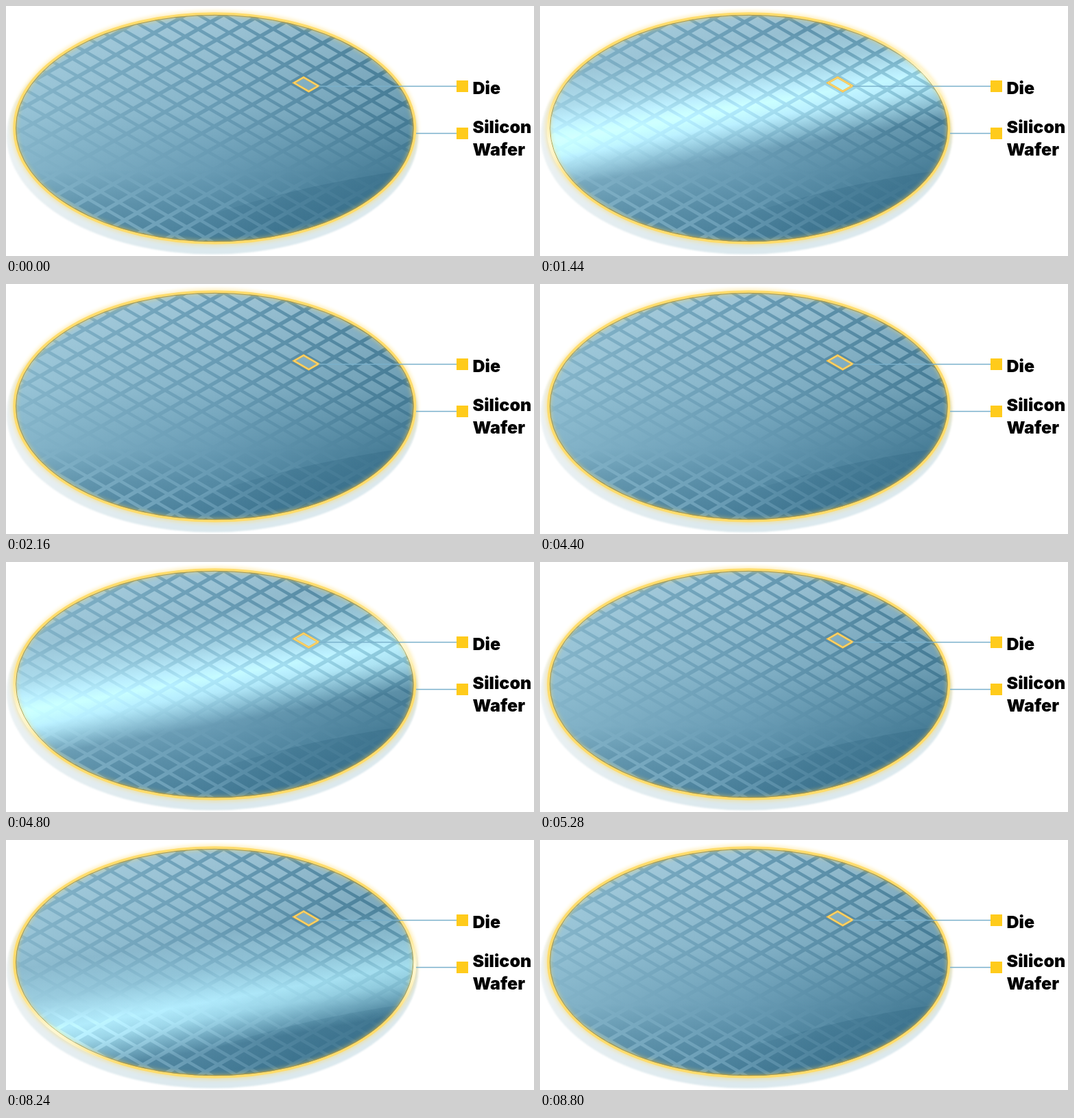
Recreate the animation shown at these times as an HTML page with a canvas. Size 770x366 px, loop 10000 ms.

```html
<!DOCTYPE html>
<html lang="en">
<head>
<meta charset="utf-8">
<title>Silicon wafer</title>
<style>
  html, body { margin: 0; width: 100%; height: 100%; overflow: hidden; background: #fff; }
  canvas, svg { position: absolute; left: 0; top: 0; }
  text { font: 900 25px Inter, sans-serif; }
</style>
</head>
<body>
<canvas id="stage" width="770" height="366"></canvas>
<svg width="770" height="366">
  <path d="M456 117.5H658M598 186.5H658" stroke="#79b0cb" stroke-width="1.3"/>
  <path d="M657 109h17v17h-17zM657 178h17v17h-17z" fill="#ffcb1b"/>
  <text x="680.5" y="129">Die</text>
  <text x="680.5" y="186">Silicon</text>
  <text x="680.5" y="218.5">Wafer</text>
</svg>
<script>
const ctx = document.getElementById('stage').getContext('2d');
const LOOP = 10000, STEP = 80, SWEEP = 840;
const SWEEP_STARTS = [1120, 4440, 7760];
const NORMAL = [0.177, 0.984]; // direction in which the shine travels

function gradient(x0, y0, x1, y1, stops) {
  const g = ctx.createLinearGradient(x0, y0, x1, y1);
  for (const [at, color] of stops) g.addColorStop(at, color);
  return g;
}

function oval(cx, cy, rx, ry) {
  const p = new Path2D();
  p.ellipse(cx, cy, rx, ry, 0, 0, 2 * Math.PI);
  return p;
}

function addTile(path, x, y) {
  path.moveTo(x, y);
  path.lineTo(x + 14, y - 8);
  path.lineTo(x + 35.5, y + 4.5);
  path.lineTo(x + 21.5, y + 12.5);
  path.closePath();
}

const tiles = new Path2D(), die = new Path2D();
for (let i = -30; i <= 30; i++)
  for (let j = -35; j <= 35; j++)
    addTile(tiles, 420 + 27 * i + 18.5 * j, 112.8 + 15.7 * i - 10.6 * j);
addTile(die, 420, 112.5);

const wafer = oval(304.3, 179, 292.2, 168);
const innerRim = oval(304.3, 179, 289.8, 165.6);
const shadow = oval(301, 190, 300, 173.5);
const lowerShade = new Path2D('M230 330Q400 264 600 238V366H230Z');

const shadowFill = gradient(0, 150, 250, 363, [[0, '#eef3f4'], [1, '#dce9ee']]);
const baseFill = gradient(20, 180, 595, 230, [[0, '#84b4c9'], [0.5, '#689bb4'], [1, '#437993']]);
const topTileFill = gradient(0, 15, 0, 245, [[0, 'rgba(207,234,245,.52)'], [0.6, 'rgba(190,226,240,.33)'], [1, 'rgba(170,215,232,0)']]);
const lowTileFill = gradient(0, 240, 0, 340, [[0, 'rgba(47,104,132,0)'], [0.5, 'rgba(47,104,132,.33)'], [1, 'rgba(47,104,132,.55)']]);
const lowerFill = gradient(240, 0, 420, 0, [[0, 'rgba(31,86,115,0)'], [1, 'rgba(31,86,115,.2)']]);

function fill(path, style) {
  ctx.fillStyle = style;
  ctx.fill(path);
}

function stroke(path, style, width) {
  ctx.strokeStyle = style;
  ctx.lineWidth = width;
  ctx.stroke(path);
}

// Soft band whose brightest line lies at distance d along NORMAL
function band(d, rgb, alpha) {
  const [nx, ny] = NORMAL, a = d - 95, b = d + 68;
  const stops = [[0, 0], [0.3, 0.35], [0.58, 1], [0.72, 0.85], [1, 0]];
  return gradient(nx * a, ny * a, nx * b, ny * b,
    stops.map(([at, k]) => [at, `rgba(${rgb},${alpha * k})`]));
}

function drawWafer(shine) {
  ctx.save();
  ctx.filter = 'blur(1.2px)';
  fill(shadow, shadowFill);
  ctx.restore();

  ctx.save();
  ctx.clip(wafer);
  fill(wafer, baseFill);
  fill(tiles, topTileFill);
  fill(tiles, lowTileFill);
  fill(lowerShade, lowerFill);
  if (shine !== null) {
    ctx.globalCompositeOperation = 'lighter';
    fill(wafer, band(shine, '70,77,70', 1));
  }
  ctx.restore();

  ctx.save();
  ctx.shadowColor = '#ffd75a';
  ctx.shadowBlur = 7;
  stroke(wafer, '#ffdc6c', 3.6);
  ctx.restore();
  stroke(innerRim, '#a9943f', 0.9);
  if (shine !== null) stroke(wafer, band(shine, '255,255,235', 0.8), 4.5);

  stroke(die, '#f8c043', 3);
  stroke(die, '#ffe08a', 1);
}

function frame(now) {
  const t = Math.floor(now % LOOP / STEP) * STEP;
  const start = SWEEP_STARTS.find(s => t >= s && t < s + SWEEP);
  ctx.clearRect(0, 0, 770, 366);
  drawWafer(start === undefined ? null : 22 + 0.55 * (t - start));
  requestAnimationFrame(frame);
}
requestAnimationFrame(frame);
</script>
</body>
</html>
```
